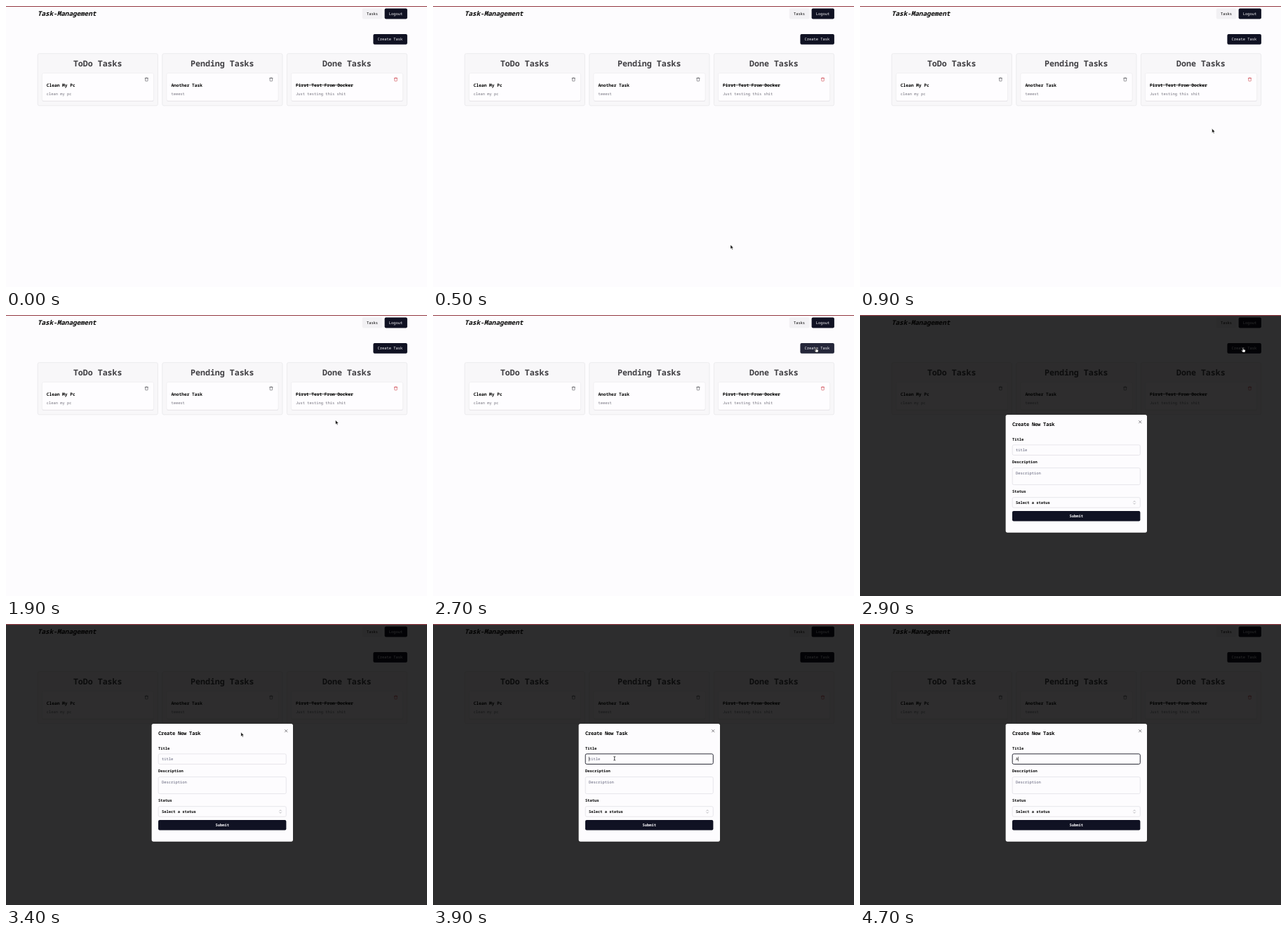
An HTML page that plays this animation: 600 px wide and 400 px high, repeating every 5 s.

```html
<!DOCTYPE html>
<html lang="en">
<head>
<meta charset="utf-8">
<title>Task board</title>
<style>
  html, body { margin: 0; width: 100%; height: 100%; overflow: hidden; background: #fdfcfe; }
  svg { display: block; }
  text {
    font: 400 5.42px "Noto Sans Mono", "DejaVu Sans Mono", monospace;
    text-rendering: geometricPrecision;
    white-space: pre;
  }
  .mid { text-anchor: middle; }
  .brand { font-size: 9.25px; font-weight: 700; font-style: italic; }
  .head { font-size: 11.6px; font-weight: 700; fill: #3f3e42; }
  .name { font-size: 6.2px; font-weight: 600; }
  .strike { text-decoration: line-through; }
  .title { font-size: 6.97px; font-weight: 700; letter-spacing: -.17px; }
  .label { font-weight: 600; }
  .note { fill: #716f7a; }
  .hint { fill: #5b5d75; }
  .light { fill: #fbfafd; font-weight: 500; }
  .line { fill: none; stroke-linecap: round; stroke-linejoin: round; }
</style>
</head>
<body>
<svg id="stage" width="600" height="400" viewBox="0 0 600 400"></svg>
<script>
const LOOP = 5000, STEP = 100;
const NAVY = '#101223', EDGE = '#e6e5e9', PAPER = '#fdfcfe';

const rect = (x, y, w, h, fill, stroke = 'none', r = 2, more = '') =>
  `<rect x="${x}" y="${y}" width="${w}" height="${h}" rx="${r}" fill="${fill}" stroke="${stroke}" stroke-width=".7" ${more}/>`;
const text = (x, y, str, cls = '', more = '') =>
  `<text x="${x}" y="${y}" class="${cls}" ${more}>${str}</text>`;
const path = (d, color, width, more = '') =>
  `<path class="line" d="${d}" stroke="${color}" stroke-width="${width}" ${more}/>`;

const trash = color => path(
  'M3 6h18M19 6v14a2 2 0 0 1-2 2H7a2 2 0 0 1-2-2V6M8 6V4a2 2 0 0 1 2-2h4a2 2 0 0 1 2 2v2',
  color, 2.4, 'transform="translate(197.3 101.4) scale(.25)"');

const column = (i, head, name, note, done) => `
  <g transform="translate(${i * 177.6} 0)">
    ${rect(45.2, 67.7, 171.2, 74.2, '#f8f7f9', EDGE, 2.3)}
    ${text(130.7, 86, head, 'head mid')}
    ${rect(51.5, 96.2, 159, 39.8, '#e4e3e7', 'none', 2.3)}
    ${rect(51.3, 95.5, 159.2, 39.6, '#fefdff', '#eeedf0', 2.3)}
    ${trash(done ? '#cf4650' : '#55545a')}
    ${text(57.8, 115, name, 'name' + (done ? ' strike' : ''))}
    ${text(57.8, 127, note, 'note')}
  </g>`;

const page = `
  ${rect(0, 0, 600, 400, PAPER, 'none', 0)}
  ${text(45, 14, 'Task-Management', 'brand')}
  ${rect(507.8, 3.6, 28.6, 14.8, '#f2f1f4')}
  ${text(513.9, 13, 'Tasks', '', 'font-weight="500"')}
  ${rect(539.6, 3.6, 32.3, 14.8, NAVY)}
  ${text(545.7, 13, 'Logout', 'light')}
  ${rect(523.4, 40, 48.5, 14.8, NAVY, 'none', 2, 'id="create"')}
  ${text(529.6, 49.4, 'Create Task', 'light')}
  ${column(0, 'ToDo Tasks', 'Clean My Pc', 'clean my pc')}
  ${column(1, 'Pending Tasks', 'Another Task', 'teeest')}
  ${column(2, 'Done Tasks', 'First Test From Docker', 'Just testing this shit', true)}`;

const dialog = `
  ${rect(207.6, 142, 201.4, 167.7, PAPER, 'none', 2.6)}
  ${text(217, 158, 'Create New Task', 'title')}
  ${path('M397.5 150.5l3.4 3.4m0-3.4l-3.4 3.4', '#55545a', .7)}
  ${text(217, 179, 'Title', 'label')}
  ${rect(217.2, 184.9, 182.1, 14.6, PAPER, '#dedde2', 2, 'id="field"')}
  ${text(222, 194, 'title', 'hint', 'id="value"')}
  ${path('M0 189.3v5.8', '#111', .6, 'id="caret"')}
  ${text(217, 211.4, 'Description', 'label')}
  ${rect(217.2, 217.7, 182.1, 23.9, PAPER, '#dedde2')}
  ${text(222, 227, 'Description', 'hint')}
  ${text(217, 253.4, 'Status', 'label')}
  ${rect(217.2, 259.7, 182.1, 14.5, PAPER, '#dedde2')}
  ${text(222, 268.7, 'Select a status', 'label')}
  ${path('M389.8 266l1.3-1.3 1.3 1.3m0 2l-1.3 1.3-1.3-1.3', '#77767c', .5)}
  ${rect(217, 279, 182.4, 14.5, NAVY)}
  ${text(308.2, 288, 'Submit', 'light mid', 'style="font-weight:600"')}`;

// Pointer shapes, each with its hot spot at 0,0
const pointers = `
  <g id="pointer">
    <path id="arrow" d="M0 0v5.8l1.4-1.2.9 2.2 1-.4-.9-2.1h1.8z" fill="#111" stroke="#fff" stroke-width=".4"/>
    <path id="hand" d="M-.7.5a.6.6 0 0 1 1.2 0v2.2l2.2.5q.6.2.5 1l-.4 2.6h-3.3l-1.8-2.4q-.2-.8.6-.6l1 .7z"
      fill="#fff" stroke="#111" stroke-width=".55"/>
    ${path('M-1-2.7q1 0 1 .6 0-.6 1-.6M0-2.1v4.2M-1 2.7q1 0 1-.6 0 .6 1 .6', '#111', .75, 'id="beam"')}
  </g>`;

document.getElementById('stage').innerHTML = `
  ${page}
  ${rect(0, 0, 600, 400, '#000', 'none', 0, 'id="shade"')}
  <g id="dialog">${dialog}</g>
  ${rect(0, 0, 600, 1.1, '#98424a', 'none', 0)}
  ${pointers}`;

const el = Object.fromEntries([...document.querySelectorAll('[id]')].map(e => [e.id, e]));
const show = (e, on) => e.setAttribute('visibility', on ? 'inherit' : 'hidden');
const clamp = v => Math.max(0, Math.min(1, v));
const ease = v => v * v * (3 - 2 * v);

// Pointer moves: start, end, target x, target y
const moves = [
  [200, 500, 424, 340],
  [600, 900, 501.7, 174.6],
  [1000, 1400, 461, 163],
  [1800, 2300, 544, 36],
  [2300, 2500, 546, 46.3],
  [3000, 3600, 261, 192],
  [3600, 3700, 258.7, 191.4],
];

function pointerAt(t) {
  let x = 420, y = 342;
  for (const [from, to, tx, ty] of moves) {
    const k = ease(clamp((t - from) / (to - from)));
    x += (tx - x) * k;
    y += (ty - y) * k;
  }
  return [x, y];
}

function draw(t) {
  const [x, y] = pointerAt(t);
  const onButton = x > 523 && y > 40 && y < 55;
  const onField = t > 3000 && x < 399 && y > 185 && y < 200;
  const open = clamp((t - 2762) / 100);
  const focused = t >= 3900, typed = t >= 4300;

  el.create.setAttribute('fill', onButton && open < 1 ? '#25273a' : NAVY);
  el.shade.setAttribute('opacity', .82 * open);
  el.dialog.setAttribute('opacity', open);
  const scale = 1 - .056 * (1 - open);
  el.dialog.setAttribute('transform',
    `translate(308.3 ${225.9 + 3.5 * (1 - open)}) scale(${scale}) translate(-308.3 -225.9)`);

  el.field.setAttribute('stroke', focused ? '#2b2c38' : '#dedde2');
  el.field.setAttribute('stroke-width', focused ? 1 : .7);
  el.value.textContent = typed ? 'A' : 'title';
  el.value.setAttribute('class', typed ? '' : 'hint');
  el.caret.setAttribute('transform', `translate(${typed ? 225.6 : 222.3} 0)`);
  show(el.caret, focused);

  el.pointer.setAttribute('transform', `translate(${x} ${y})`);
  show(el.pointer, t >= 300 && !typed);
  show(el.hand, onButton);
  show(el.beam, onField);
  show(el.arrow, !onButton && !onField);
}

const start = performance.now();
function tick() {
  const t = (performance.now() - start) % LOOP;
  draw(Math.floor(t / STEP) * STEP);
  requestAnimationFrame(tick);
}
tick();
</script>
</body>
</html>
```
